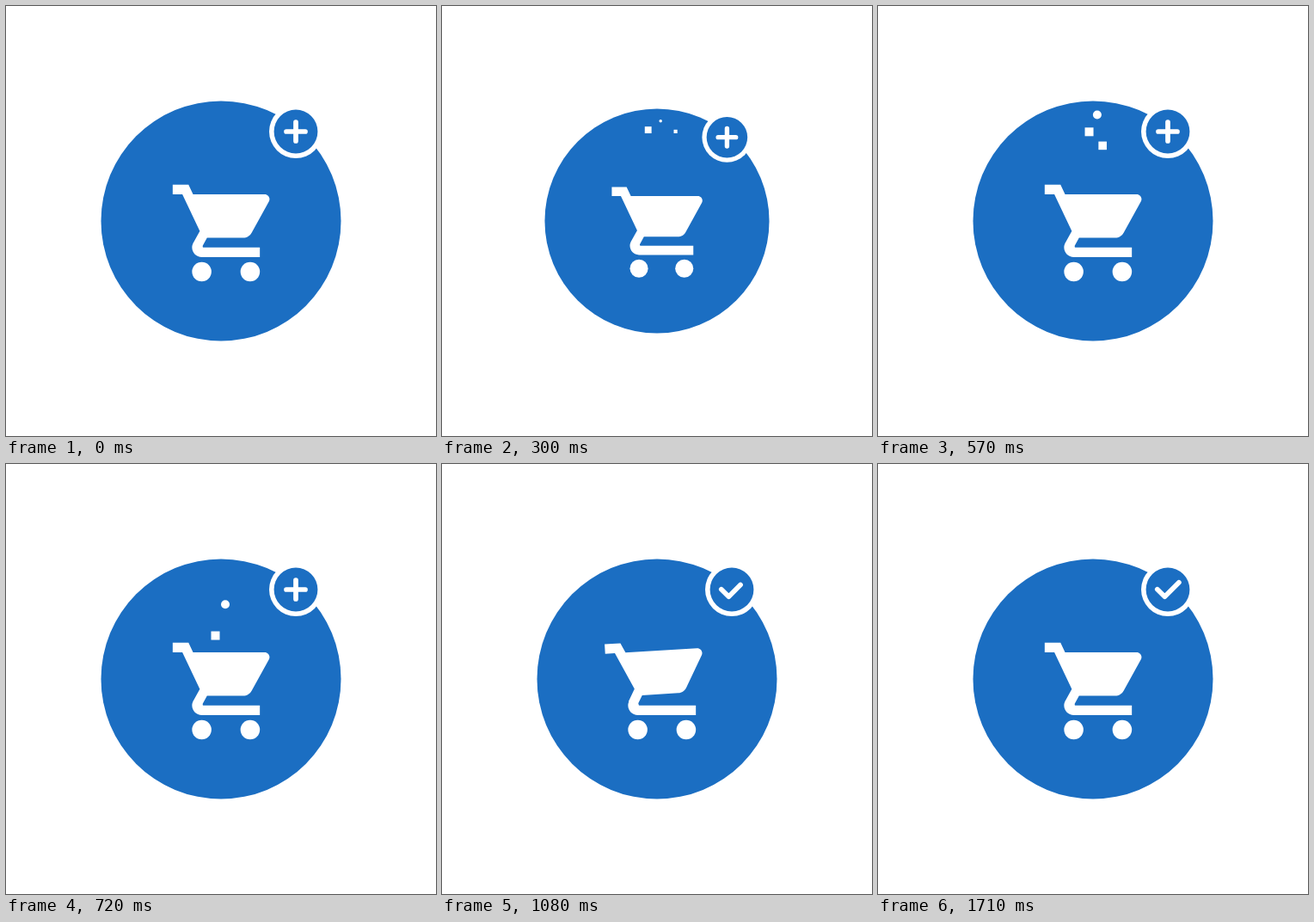
An HTML page for the animation above (1.86 s loop, 500 px wide and 500 px high).

```html
<!DOCTYPE html>
<html lang="en">
<head>
<meta charset="utf-8">
<title>Add to cart</title>
<style>
  html, body { margin: 0; width: 100%; height: 100%; overflow: hidden; background: #fff; }
  svg { display: block; width: 100%; height: 100%; }
  .blue { fill: #1b6ec2; }
  .white { fill: #fff; }
  .line { fill: none; stroke: #fff; stroke-width: 5.7; stroke-linecap: round; stroke-linejoin: round; }
</style>
</head>
<body>
<svg viewBox="0 0 500 500">
  <g id="button">
    <circle class="blue" cx="250" cy="250" r="139.5"/>
    <g class="white">
      <rect id="boxA"/>
      <rect id="boxB"/>
      <circle id="ball"/>
    </g>
    <g class="white" transform="translate(188.2 196.4) scale(5.63)">
      <path id="basket" d="M1 2v2h2l3.6 7.59-1.35 2.45L5.6 15H7l.2-.37.9-1.63h7.45c.75 0 1.41-.41 1.75-1.03l3.58-6.49c.08-.14.12-.31.12-.48 0-.55-.45-1-1-1H5.21l-.94-2z"/>
      <path d="M5.25 14.04c-.16.28-.25.61-.25.96 0 1.1.9 2 2 2h12v-2H7.42c-.14 0-.25-.11-.25-.25l.03-.12z"/>
      <circle cx="7" cy="20" r="2"/>
      <circle cx="17" cy="20" r="2"/>
    </g>
    <circle class="white" cx="337" cy="146" r="31"/>
    <circle class="blue" cx="337" cy="146" r="25.4"/>
    <path id="plus" class="line" d="M-11 0H11M0-11V11"/>
    <path id="check" class="line" pathLength="1" d="M324.8 145.8L333.4 154.2 349.9 137.7"/>
  </g>
</svg>
<script>
const LOOP = 1860, STEP = 30;
const $ = id => document.getElementById(id);

const linear = p => p;
const smooth = p => p * p * (3 - 2 * p);
const fall = p => p * p;

// Cubic bezier (.33, 0, .4, 1), solved by bisection
function settle(p) {
  let lo = 0, hi = 1;
  for (let i = 0; i < 24; i++) {
    const s = (lo + hi) / 2, r = 1 - s;
    const x = 3 * r * r * s * 0.33 + 3 * r * s * s * 0.4 + s * s * s;
    if (x < p) lo = s; else hi = s;
  }
  return smooth(lo);
}

// Keys are [time, value, easing into this key]
function track(keys, t) {
  if (t <= keys[0][0]) return keys[0][1];
  for (let i = 1; i < keys.length; i++) {
    const [t0, a] = keys[i - 1], [t1, b, ease = smooth] = keys[i];
    if (t < t1) return a + (b - a) * ease((t - t0) / (t1 - t0));
  }
  return keys[keys.length - 1][1];
}

const press = [[0, 1], [180, 0.9], [550, 1, settle]];
const tilt = [[780, 0], [960, 3], [1080, -3.5], [1190, 1.6], [1300, -0.8], [1410, 0.35], [1520, -0.15], [1620, 0]];
const plusSize = [[780, 1], [930, 0]];
const checkDraw = [[930, 0], [1120, 1]];

const items = [
  { id: "boxA",
    x: [[150, 231], [450, 247], [720, 243.5]],
    y: [[180, 135.5], [450, 138.7], [490, 139], [790, 242, fall]],
    size: [[150, 0], [180, 3.8, linear], [360, 10]] },
  { id: "boxB",
    x: [[180, 281], [450, 262], [720, 260]],
    y: [[180, 141], [420, 136.5], [720, 240, fall]],
    size: [[160, 0], [180, 1.7, linear], [480, 9.6]] },
  { id: "ball",
    x: [[180, 254.4], [720, 255]],
    y: [[180, 126.7], [450, 124.4], [550, 126], [850, 242, fall]],
    size: [[165, 0], [180, 1.2, linear], [520, 10]] }
];

function set(el, attrs) {
  for (const name in attrs) el.setAttribute(name, attrs[name]);
}

function placeItem(item, t) {
  const x = track(item.x, t), y = track(item.y, t), size = track(item.size, t);
  const el = $(item.id);
  if (item.id === "ball") set(el, { cx: x, cy: y, r: size / 2 });
  else set(el, { x: x - size / 2, y: y - size / 2, width: size, height: size });
  el.style.display = t < 900 ? "" : "none";
}

function draw(t) {
  const scale = track(press, t);
  set($("button"), { transform: `translate(250 250) scale(${scale}) translate(-250 -250)` });
  set($("basket"), { transform: `rotate(${track(tilt, t)} 6 16)` });
  items.forEach(item => placeItem(item, t));

  const size = track(plusSize, t);
  set($("plus"), { transform: `translate(337 146) scale(${size})` });
  $("plus").style.display = size > 0 ? "" : "none";

  const drawn = track(checkDraw, t);
  set($("check"), { "stroke-dasharray": drawn < 1 ? `${drawn} 2` : "none" });
  $("check").style.display = drawn > 0 ? "" : "none";
}

const start = performance.now();
function tick() {
  const t = (performance.now() - start) % LOOP;
  draw(Math.floor(t / STEP) * STEP);
  requestAnimationFrame(tick);
}
tick();
</script>
</body>
</html>
```
